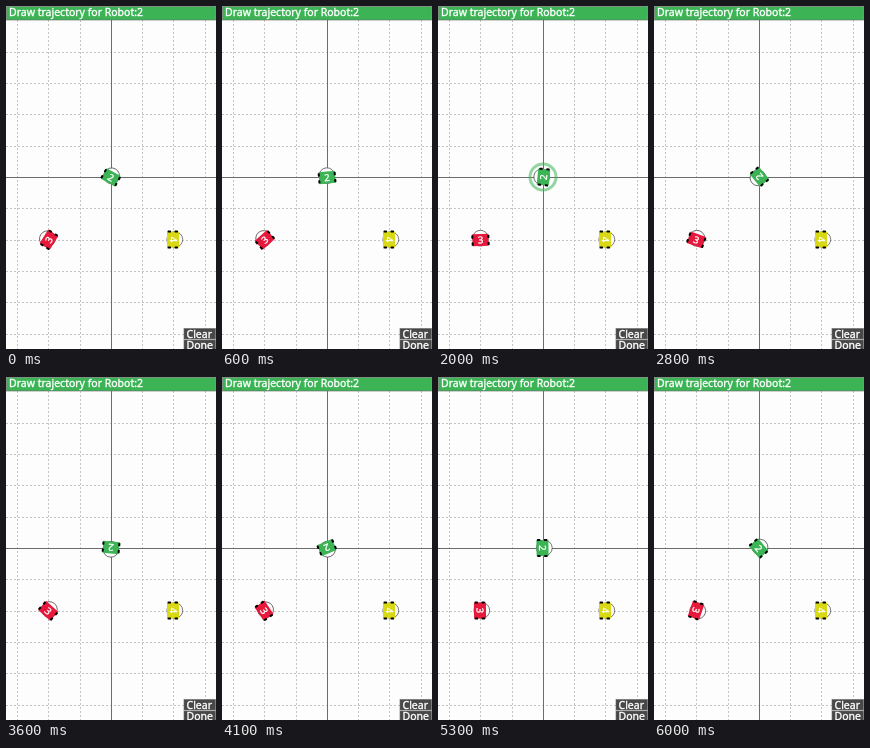
Recreate the animation shown at these times as an HTML page. Size 210 by 343 pixels, loop 6.1 s.

```html
<!DOCTYPE html>
<html>
<head>
<meta charset="utf-8">
<style>
html, body { margin: 0; width: 100%; height: 100%; overflow: hidden; background: #fdfdfd; }
svg { display: block; width: 210px; height: 343px; }
text { font-family: "Noto Sans", "Open Sans", sans-serif; fill: #fff; stroke: #fff; stroke-width: .35px; }
.label { font-size: 10.5px; }
.box { stroke: #666; stroke-opacity: .6; }
</style>
</head>
<body>
<svg id="stage" viewBox="0 0 210 343">
  <rect width="210" height="343" fill="#fdfdfd"/>
  <g id="grid" stroke="#c4c4c4" stroke-dasharray="2 2" shape-rendering="crispEdges"></g>
  <path d="M105.5 14V343M0 171.5H210" stroke="#6c6c6c" shape-rendering="crispEdges"/>
  <g id="robots"></g>
  <circle id="ring" cx="105" cy="171" r="13" fill="none" stroke="#3cb456" stroke-opacity=".55" stroke-width="3"/>
  <rect class="box" x=".5" y=".5" width="209" height="13.5" fill="#3cb456"/>
  <text class="label" x="3" y="9.8">Draw trajectory for Robot:2</text>
  <rect class="box" x="178" y="322.5" width="31.5" height="10.5" fill="#484848"/>
  <rect class="box" x="178" y="334" width="31.5" height="10" fill="#484848"/>
  <text class="label" x="180.5" y="332">Clear</text>
  <text class="label" x="180.5" y="343">Done</text>
</svg>
<script>
const NS = "http://www.w3.org/2000/svg";
const LOOP = 6100, STEP = 100, CELL = 31.3;
const $ = id => document.getElementById(id);

function add(parent, tag, attrs) {
  const el = document.createElementNS(NS, tag);
  for (const k in attrs) el.setAttribute(k, attrs[k]);
  return parent.appendChild(el);
}

function line(d) { add($("grid"), "path", { d }); }
for (let i = -4; i <= 5; i++) {
  const p = Math.floor(105.3 + i * CELL) + 0.5;
  const q = Math.floor(171.5 + i * CELL) + 0.5;
  if (i && Math.abs(i) < 4) line(`M${p} 14V343`);
  if (i) line(`M0 ${q}H210`);
}

// Heading in degrees clockwise from up; spin in degrees per second.
const robots = [
  { label: "2", x: 105, y: 171, color: "#3cb456", heading: 29, spin: -56.6 },
  { label: "3", x: 42.5, y: 233.5, color: "#e6193c", heading: -58, spin: 27.8 },
  { label: "4", x: 167.5, y: 233.5, color: "#d8d814", heading: 90, spin: 0 }
];

for (const r of robots) {
  r.el = add($("robots"), "g", {});
  add(r.el, "circle", { cy: -1.3, r: 7.9, fill: "#fdfdfd", stroke: "#555", "stroke-width": 0.8 });
  add(r.el, "rect", { x: -8, y: -5.5, width: 16, height: 12, fill: r.color });
  for (const x of [-9, 7])
    for (const y of [-4.5, 2.5])
      add(r.el, "rect", { x, y, width: 2, height: 3.4, rx: 0.6, fill: "#000" });
  add(r.el, "text", { y: 4, "font-size": 9.6, "text-anchor": "middle" }).textContent = r.label;
}

function draw(ms) {
  const t = Math.floor((ms % LOOP) / STEP) * STEP;
  for (const r of robots) {
    const a = r.heading + r.spin * t / 1000;
    r.el.setAttribute("transform", `translate(${r.x} ${r.y}) rotate(${a})`);
  }
  $("ring").setAttribute("visibility", t >= 1800 && t < 2300 ? "visible" : "hidden");
}

const start = performance.now();
function tick() {
  draw(performance.now() - start);
  requestAnimationFrame(tick);
}
draw(0);
tick();
</script>
</body>
</html>
```
